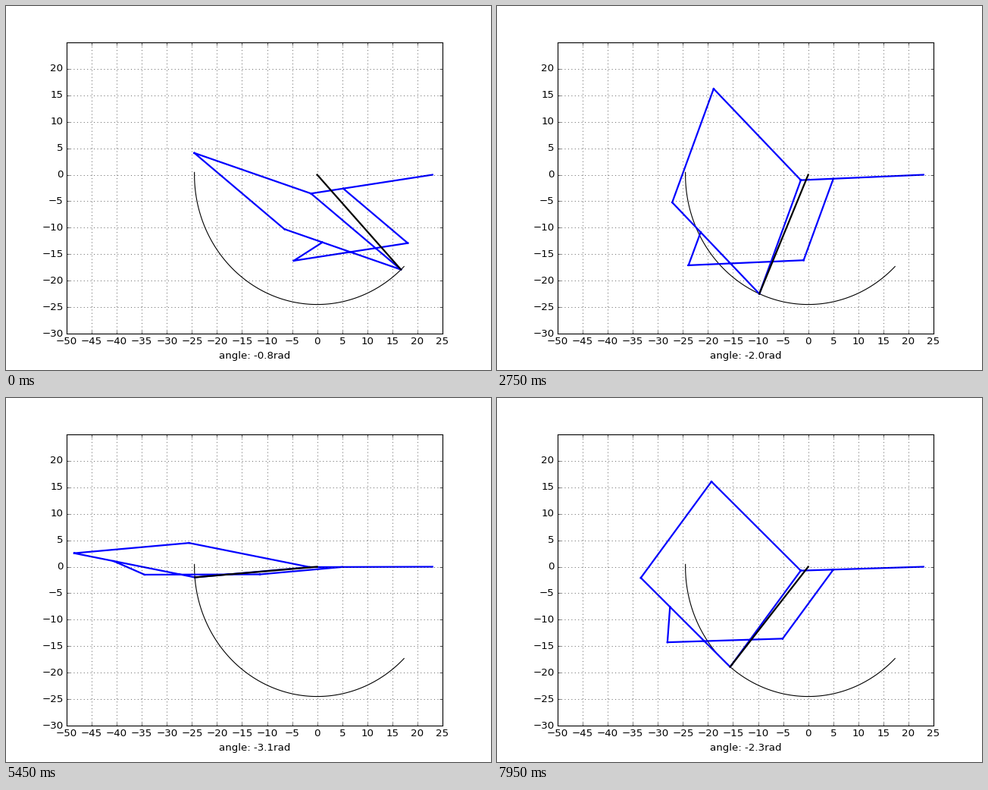
A matplotlib script for the animation above (8000 ms loop, 640x480 px).

```python
import numpy as np
import matplotlib.pyplot as plt
from matplotlib.animation import FuncAnimation

plt.style.use("classic")
plt.rcParams.update({
    "font.family": "DejaVu Sans",
    "figure.dpi": 80,
    "savefig.dpi": 80,
    "figure.facecolor": "white",
    "savefig.facecolor": "white",
})

FRAMES, INTERVAL = 160, 50
STEP = 0.02
FIRST_ANGLE = -0.82
TURN = 117                  # steps until the crank reverses
SKIP_AT, SKIP = 36, 3       # the crank jumps ahead here

CRANK, BASE = 24.5, 23.0    # sides of the crossed four-bar
ORIGIN = np.array([0.0, 0.0])
PIVOT = np.array([BASE, 0.0])


def crank_angle(i):
    n = i + (SKIP if i >= SKIP_AT else 0)
    return FIRST_ANGLE - STEP * (TURN - abs(n - TURN))


def meet(p, q, rp, rq):
    """Circle intersection lying to the right of the way from p to q."""
    d = np.hypot(*(q - p))
    u = (q - p) / d
    along = (rp**2 - rq**2 + d**2) / (2 * d)
    h = np.sqrt(max(rp**2 - along**2, 0.0))
    return p + along * u + h * np.array([u[1], -u[0]])


def linkage(angle):
    """Crank end and the list of bars for a crank angle."""
    p = CRANK * np.array([np.cos(angle), np.sin(angle)])
    b = meet(PIVOT, p, CRANK, BASE)
    arm = (b - PIVOT) / CRANK
    leg = (p - b) / BASE
    c = PIVOT + 18 * arm
    d = c + 16.5 * leg
    e = d + 23 * arm
    f = meet(p, e, 16.5, 6.7)
    reach = (f - p) / 16.5 * CRANK
    t, q = b + reach, p + reach
    bars = [(PIVOT, b), (b, p), (b, t), (t, q), (q, p), (c, d), (d, e), (e, f)]
    return p, bars


fig = plt.figure(figsize=(8, 6))
ax = fig.add_axes([0.125, 0.1, 0.775, 0.8])
ax.set_xlim(-50, 25)
ax.set_ylim(-30, 25)
ax.set_xticks(np.arange(-50, 26, 5))
ax.set_yticks(np.arange(-30, 25, 5))
ax.grid(True)

sweep = np.linspace(-np.pi / 4, -3.16, 120)
ax.plot(CRANK * np.cos(sweep), CRANK * np.sin(sweep), "k", lw=1)
bar_line, = ax.plot([], [], "b", lw=2)
crank_line, = ax.plot([], [], "k", lw=2)
label = ax.set_xlabel("")


def draw(i):
    angle = crank_angle(i)
    p, bars = linkage(angle)
    gap = np.array([np.nan, np.nan])
    pts = np.array([pt for s, e in bars for pt in (s, e, gap)])
    bar_line.set_data(pts[:, 0], pts[:, 1])
    crank_line.set_data([ORIGIN[0], p[0]], [ORIGIN[1], p[1]])
    label.set_text(f"angle: {angle:.1f}rad")
    return bar_line, crank_line, label


anim = FuncAnimation(fig, draw, frames=FRAMES, interval=INTERVAL,
                     init_func=lambda: draw(0), repeat=True)
plt.show()
```
